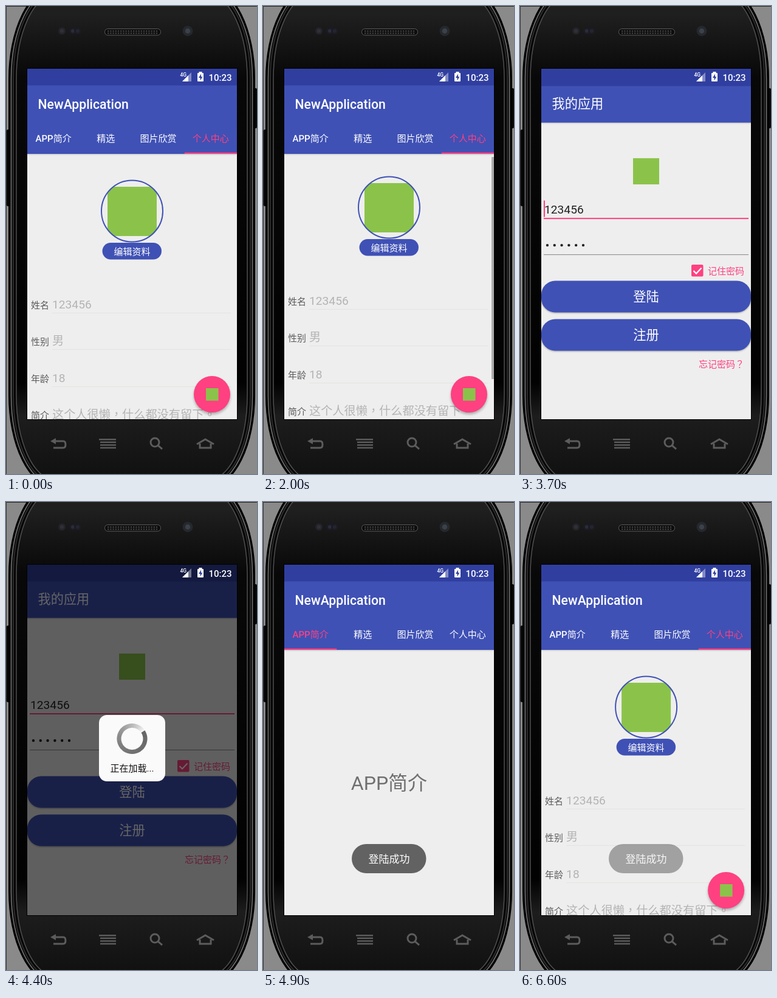
Animation of 413 by 769 pixels, one loop 6.7 s. Source, as an HTML page:

```html
<!DOCTYPE html>
<html lang="zh-CN">
<head>
<meta charset="utf-8">
<title>App login</title>
<style>
html, body { margin: 0; width: 100%; height: 100%; overflow: hidden; background: #8a8a8a; }
svg { display: block; width: 413px; height: 769px; }
text { font-family: Roboto, "Noto Sans CJK SC", "Noto Sans CJK", sans-serif; white-space: pre; }
.centred { font-family: Roboto, "Noto Sans CJK TC", "Noto Sans CJK", sans-serif; }
</style>
</head>
<body>
<svg id="stage" viewBox="0 0 413 769" xmlns="http://www.w3.org/2000/svg"></svg>
<script>
const BLUE = '#3f51b5', DARK = '#303f9f', PINK = '#ff4081', GREEN = '#8bc34a', PAPER = '#eeeeee';
const LOOP = 6700, STEP = 100;
const LEFT = 35, TOP = 103, WIDTH = 345, HEIGHT = 576, BAR_END = 243, TAB = WIDTH / 4, MID = LEFT + WIDTH / 2;
const MEDIUM = 'font-weight="500"', CENTRED = 'class="centred" lang="zh-TW"';

const rect = (x, y, w, h, fill, r = 0, more = '') =>
  `<rect x="${x}" y="${y}" width="${w}" height="${h}" rx="${r}" fill="${fill}" ${more}/>`;
const circle = (x, y, r, fill, more = '') =>
  `<circle cx="${x}" cy="${y}" r="${r}" fill="${fill}" ${more}/>`;
const path = (d, more) => `<path d="${d}" ${more}/>`;
// y is the optical middle of the line
const text = (s, x, y, size, fill, anchor = 'start', more = '') =>
  `<text x="${x}" y="${y + size * 0.37}" font-size="${size}" fill="${fill}" text-anchor="${anchor}" ${more}>${s}</text>`;
const list = (n, f) => Array.from({ length: n }, (_, i) => f(i)).join('');
const group = (id, body) => `<g id="${id}">${body}</g>`;
const page = (fill, more = '') => rect(LEFT, TOP, WIDTH, HEIGHT, fill, 0, more);

function phone() {
  const shell = (inset, fill, stroke, w) =>
    rect(5 + inset, inset - 30, 404 - 2 * inset, 820 - 2 * inset, fill, 75 - inset,
      `ry="${150 - inset}" stroke="${stroke}" stroke-width="${w}"`);
  const lens = (x, r, outer, inner) => circle(x, 41, r, outer) + circle(x, 41, r / 2, inner);
  const key = 'fill="none" stroke="#5c5c5c" stroke-width="3"';
  return rect(0, 0, 413, 769, '#8a8a8a') +
    rect(0, 0, 413, 1, '#222') + rect(0, 0, 1, 769, '#333') +
    rect(1, 203, 8, 126, '#080808', 2) + rect(406, 135, 7, 66, '#080808', 2) +
    shell(0, '#050505', '#000', 2) +
    shell(3.5, '#0a0a0a', '#777', 1.5) +
    shell(7, '#060606', '#2b2b2b', 2) +
    shell(12, 'url(#face)', '#505050', 1.5) +
    lens(92, 6, '#24242a', '#303038') + lens(110, 6, '#1b1b22', '#2b2b3a') +
    lens(118, 6, '#1b1b22', '#252530') + lens(299, 8.5, '#25282d', '#3a4149') +
    rect(162.5, 37.5, 92, 10.5, '#0c0c0c', 5, 'stroke="#5c5c5c"') +
    list(40, i => rect(167 + (i >> 1) * 4.2, 40 + i % 2 * 3.6, 2.4, 2.4, '#3e3e3e')) +
    path('M80 715H94Q98 715 98 720.5T94 726H78', key) + path('M73 715L82 710V720Z', 'fill="#5c5c5c"') +
    list(4, i => rect(i ? 155 : 153, 711 + i * 4.6, i ? 26 : 28, 2.4, '#5c5c5c')) +
    circle(245, 717, 7, 'none', key) + path('M250 722L257 728', key) +
    path('M314 720L328 712L342 720M319 719V726H337V719', key);
}

const statusIcons = () =>
  text('4G', 286.5, 112.5, 8.5, '#fff', 'start', MEDIUM) +
  path('M290 124L305 109V124Z', 'fill="#fff" opacity=".4"') +
  path('M290 124L300 114V124Z', 'fill="#fff"') +
  rect(317.5, 108, 5, 3, '#fff') + rect(315, 110, 10, 14, '#fff', 1) +
  path('M321 111.5L317 118H319.6V122.5L323.4 116.2H321Z', `fill="${DARK}"`) +
  text('10:23', 371.5, 117, 15, '#fff', 'end', MEDIUM);

const header = (end, title, y, more) =>
  rect(LEFT, TOP, WIDTH, end - TOP + 1, '#000', 0, 'opacity=".2" filter="url(#soft)"') +
  rect(LEFT, TOP, WIDTH, end - TOP, BLUE) + rect(LEFT, TOP, WIDTH, 27.5, DARK) +
  text(title, 52.5, y, 21.2, '#fff', 'start', more);

const button = (x, y, w, label, size, id) =>
  rect(x, y + 1.5, w, 52, '#000', 23, 'opacity=".25" filter="url(#soft)"') +
  rect(x, y, w, 52, BLUE, 23) +
  (id ? rect(x, y, w, 52, '#fff', 23, `id="${id}"`) : '') +
  text(label, x + w / 2, y + 26, size, '#fff', 'middle');

function profile() {
  const rows = [['姓名', '123456'], ['性别', '男'], ['年龄', '18'], ['简介', '这个人很懒，什么都没有留下。']];
  const content =
    `<g clip-path="url(#avatar)">${rect(167, 297, 81, 81, GREEN)}</g>` +
    circle(MID, 337, 50.5, 'none', `stroke="${BLUE}" stroke-width="2"`) +
    rect(158.5, 389, 97.5, 27.5, BLUE, 13.7) + text('编辑资料', MID, 403, 15, '#fff', 'middle', MEDIUM) +
    rows.map(([name, value], i) => {
      const y = Math.round(490 + i * 60.4);
      return text(name, 41, y + 1, 15, '#5c5c5c') + text(value, 76, y, 19.2, '#b4b4b4', 'start', CENTRED) +
        rect(76, y + 14, 294, 1, '#e3e3df');
    }).join('') +
    button(41, 706, 333, '退出登录', 19.2, 'logoutPress');
  return page(PAPER) + group('scroll', content) +
    rect(376, BAR_END, 4, 365, '#000', 0, 'id="thumb"') +
    path('M35 679Q207 645 380 679Z', `id="glow" fill="${BLUE}"`) +
    circle(339, 641, 30, '#000', 'opacity=".28" filter="url(#blur)"') +
    circle(339, 638, 30, PINK) + rect(329, 628, 20.5, 20.5, GREEN);
}

const articles = () => page(PAPER) + [...'一二三四五'].map((n, i) =>
  text(`移动应用开发入门教程（${n}）`, 45, 275 + i * 86.4, 19.2, '#555') +
  rect(45, 328 + i * 86.4, 325, 1, '#d8d8d8')).join('');

function mainScreen() {
  const intro = page(PAPER) + text('APP简介', MID, 461.5, 32, '#6f6f6f', 'middle');
  const pages = [intro, articles(), page(PAPER), profile()];
  const names = ['APP简介', '精选', '图片欣赏', '个人中心'];
  return page(PAPER) +
    group('pager', pages.map((p, i) => `<g transform="translate(${i * WIDTH} 0)">${p}</g>`).join('')) +
    header(BAR_END, 'NewApplication', 161, MEDIUM) +
    names.map((s, i) => text(s, LEFT + TAB * (i + 0.5), 217, 15, '#fff', 'middle', 'class="tab" ' + MEDIUM)).join('') +
    rect(LEFT, BAR_END - 2.3, TAB, 2.3, PINK, 0, 'id="marker"');
}

const loginScreen = () =>
  page(PAPER) + header(190.5, '我的应用', 159.5, '') +
  rect(186, 249, 43, 43, GREEN) +
  text('123456', 40, 332.5, 19.2, '#212121') +
  rect(39, 318.5, 2, 27, PINK, 0, 'id="cursor"') +
  rect(39, 347, 337, 2, PINK) +
  list(6, i => circle(45 + i * 11.8, 392, 2.2, '#212121')) +
  rect(39, 407, 337, 1, '#858585') +
  rect(282, 424, 19.5, 19.5, PINK, 2) +
  path('M285.5 434L290 438.5L298.5 429.5', 'fill="none" stroke="#fff" stroke-width="2.2"') +
  text('记住密码', 309, 434, 15, PINK) +
  button(LEFT, 450.5, WIDTH, '登陆', 21.3, 'loginPress') +
  button(LEFT, 513.5, WIDTH, '注册', 21.3) +
  text('忘记密码？', 294, 587, 15, PINK, 'start', CENTRED);

function dialog() {
  const n = 48, r = 21.5;
  const at = a => `${r * Math.cos(a)} ${r * Math.sin(a)}`;
  const ring = list(n, i => {
    const a = -0.6 + i * 2 * Math.PI / n, k = i / n;
    const v = Math.round(100 + 35 * k + 115 * k ** 4);
    return path(`M${at(a)}A${r} ${r} 0 0 1 ${at(a + 0.15)}`, `fill="none" stroke="rgb(${v},${v},${v})" stroke-width="7"`);
  });
  return rect(153, 350, 109, 109, '#fafafa', 13) +
    `<g transform="translate(${MID} 389)">${group('spinner', ring)}</g>` +
    text('正在加载...', MID, 437, 15, '#111', 'middle');
}

const toast = () => rect(146, 562, 122.5, 48, '#626262', 24) +
  text('登陆成功', MID, 586.5, 17, '#fff', 'middle');

const stage = document.getElementById('stage');
stage.innerHTML = `<defs>
  <linearGradient id="face" x1="0" y1="0" x2="0" y2="1">
    <stop offset=".04" stop-color="#1f1f1f"/><stop offset=".17" stop-color="#080808"/>
    <stop offset=".8" stop-color="#020202"/><stop offset=".87" stop-color="#1d1d1d"/>
    <stop offset="1" stop-color="#101010"/>
  </linearGradient>
  <filter id="soft"><feGaussianBlur stdDeviation="0.9"/></filter>
  <filter id="blur" x="-20%" y="-20%" width="140%" height="140%"><feGaussianBlur stdDeviation="2.2"/></filter>
  <clipPath id="avatar">${circle(MID, 337, 50, '#000')}</clipPath>
  <clipPath id="screen">${page('#000')}</clipPath>
</defs>` + phone() + rect(LEFT - 1, TOP - 1, WIDTH + 2, HEIGHT + 2, '#000') +
  `<g clip-path="url(#screen)">` + page('#131940') +
  group('main', mainScreen()) + group('login', loginScreen()) +
  page('#000', 'id="dim"') + group('dialog', dialog()) + group('toast', toast()) +
  statusIcons() + '</g>';

const parts = {};
stage.querySelectorAll('[id]').forEach(e => parts[e.id] = e);
const tabs = stage.querySelectorAll('.tab');

const move = (name, x, y) => parts[name].setAttribute('transform', `translate(${x} ${y})`);
const fade = (name, a) => parts[name].setAttribute('opacity', a);

function draw(t) {
  const ramp = (a, b) => Math.min(1, Math.max(0, (t - a) / (b - a)));
  const smooth = (a, b) => { const u = ramp(a, b); return u * u * (3 - 2 * u); };
  const settle = (a, b, power) => 1 - (1 - ramp(a, b)) ** power;
  const pulse = (a, b) => Math.sin(Math.PI * ramp(a, b));
  const loggedIn = t >= 4600;

  // Profile page: flick down, back up, then down to the end
  const y = loggedIn ? 0 : 74 * smooth(500, 900) - 68 * smooth(1600, 2000) + 79 * smooth(2200, 2700);
  move('scroll', 0, -y);
  move('thumb', 0, y * 0.84);
  fade('thumb', 0.28 * (ramp(500, 600) - ramp(1200, 1400) + ramp(1600, 1700) - ramp(3100, 3300)));
  fade('glow', 0.14 * pulse(2500, 3000));
  fade('logoutPress', 0.2 * pulse(3000, 3400));

  // Login screen slides in, then loads
  fade('login', loggedIn ? 0 : ramp(3200, 3500));
  move('login', 0, 40 * (1 - settle(3200, 3800, 2)));
  fade('cursor', t >= 3500 && t < 4000 ? 1 : 0);
  fade('loginPress', 0.2 * pulse(3900, 4300));
  const loading = loggedIn ? 0 : ramp(4000, 4300);
  fade('dim', 0.6 * loading);
  fade('dialog', loading);
  parts.spinner.setAttribute('transform', `rotate(${(t - 4400) * 0.36})`);

  // Main screen returns on the first tab and swipes to the last
  move('main', 0, loggedIn ? 32 * (1 - settle(4500, 4900, 2)) : 0);
  fade('toast', ramp(4600, 4900) - ramp(6500, 6720));
  const shown = loggedIn ? 3 * settle(6182, 6682, 5) : 3;
  move('pager', -shown * WIDTH, 0);
  move('marker', shown * TAB, 0);
  const chosen = loggedIn && t < 6200 ? 0 : 3;
  tabs.forEach((tab, i) => tab.setAttribute('fill', i === chosen ? PINK : '#fff'));
}

const start = performance.now();
function tick() {
  const t = (performance.now() - start) % LOOP;
  draw(Math.floor(t / STEP) * STEP);
  requestAnimationFrame(tick);
}
tick();
</script>
</body>
</html>
```
